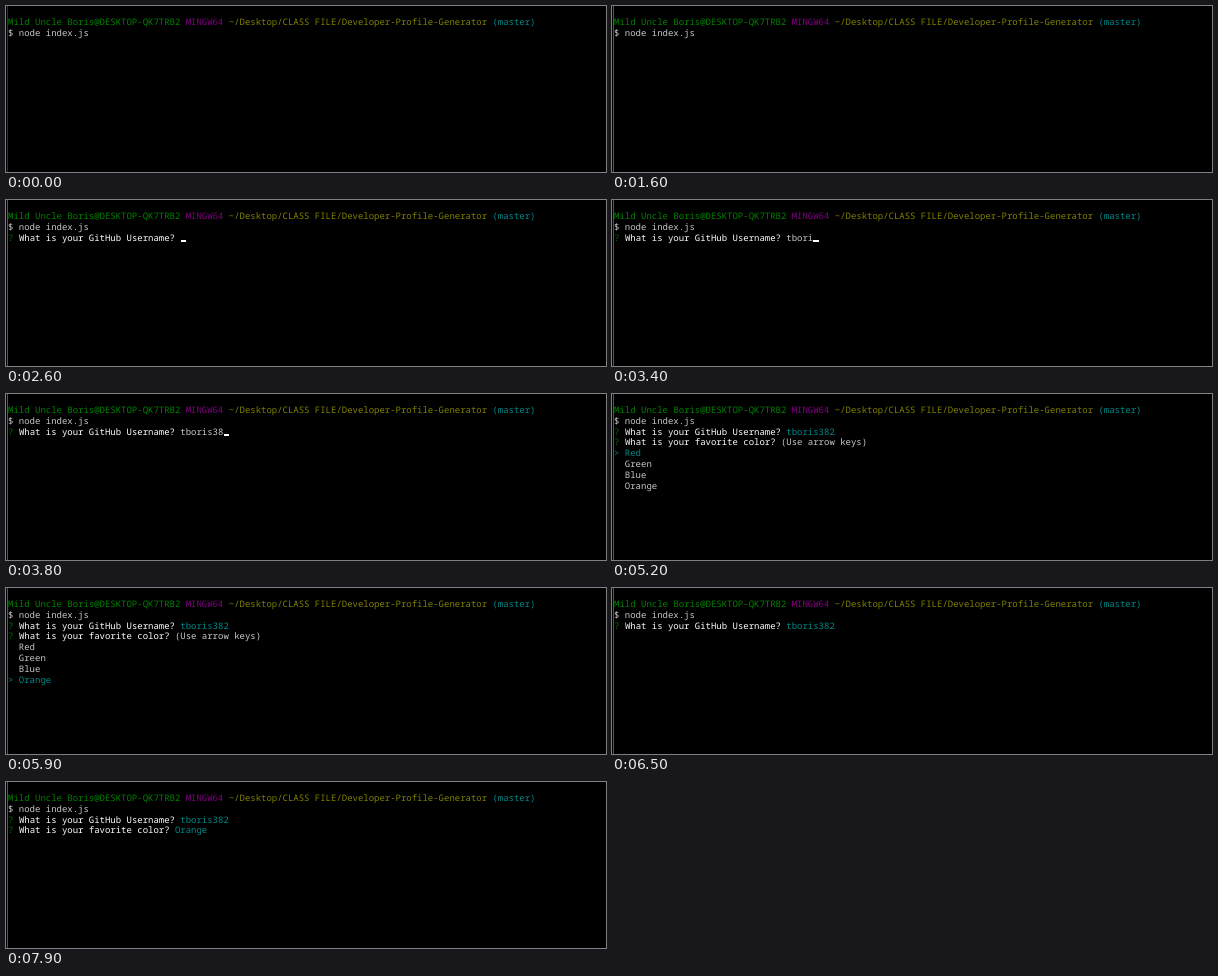
An HTML page that plays this animation: 600x166 px, repeating every 8 s.

```html
<!DOCTYPE html>
<html lang="en">
<head>
<meta charset="utf-8">
<title>Terminal prompt</title>
<style>
  html, body { margin: 0; width: 100%; height: 100%; overflow: hidden; background: #000; }
  #term {
    position: relative; width: 600px; height: 166px; overflow: hidden;
    font: 8.98px/10.86px "Noto Sans Mono", "DejaVu Sans Mono", monospace;
    text-rendering: geometricPrecision; font-kerning: none; font-variant-ligatures: none;
    color: #c8c8c8; white-space: pre;
  }
  #edge { position: absolute; left: 1px; top: 0; width: 1px; height: 166px; background: #303030; }
  #edge.focus { background: #267339; }
  .row { position: absolute; left: 2.1px; height: 10.86px; }
  #cursor { position: absolute; width: 5.4px; height: 2px; background: #fff; }
  .g { color: #008000; }
  .m { color: #800080; }
  .y { color: #808000; }
  .c { color: #008888; }
  .w { color: #fff; font-weight: 500; }
  .q { color: #006a00; }
</style>
</head>
<body>
<div id="term"><div id="edge"></div><div id="cursor"></div></div>
<script>
const LOOP = 8000, COL = 5.388, ROW = 10.86, LEFT = 2.1, TOP = 10.8;
const USER = 'tboris382';
const COLORS = ['Red', 'Green', 'Blue', 'Orange'];
const KEYS = [2800, 2900, 3000, 3300, 3400, 3500, 3600, 3700, 4200];
const PICKS = [5300, 5600, 5900];
const ASK = 1900, ENTER = 4500, CLEAR = 6500, DONE = 6600;

// [from, to, row, column]; typing moves the column along
const CURSOR = [
  [100, 500, 1, 15],
  [1000, 1400, 2, 0],
  [ASK, 2200, 2, 32],
  [2600, ENTER, 2, 32],
  [DONE, 6900, 4, 0],
  [7400, 7800, 4, 0]
];

const term = document.getElementById('term');
const edge = document.getElementById('edge');
const cursor = document.getElementById('cursor');

const span = (cls, text) => `<span class="${cls}">${text}</span>`;
const passed = (times, t) => times.filter(at => t >= at).length;
const question = text => span('q', '?') + ' ' + span('w', text) + ' ';

const rows = Array.from({ length: 8 }, (_, i) => {
  const el = document.createElement('div');
  el.className = 'row';
  el.style.top = TOP + i * ROW + 'px';
  return term.appendChild(el);
});

const prompt = [
  span('g', 'Mild Uncle Boris@DESKTOP-QK7TRB2'),
  span('m', 'MINGW64'),
  span('y', '~/Desktop/CLASS FILE/Developer-Profile-Generator'),
  span('c', '(master)')
].join(' ');

function lines(t) {
  const out = [prompt, '$ node index.js'];
  if (t < ASK) return out;

  const typed = USER.slice(0, passed(KEYS, t));
  out.push(question('What is your GitHub Username?') + (t < ENTER ? typed : span('c', typed)));
  if (t < ENTER || (t >= CLEAR && t < DONE)) return out;

  const ask = question('What is your favorite color?');
  if (t >= DONE) return [...out, ask + span('c', 'Orange')];

  const pick = passed(PICKS, t);
  const list = COLORS.map((name, i) => i === pick ? span('c', '&gt; ' + name) : '  ' + name);
  return [...out, ask + '(Use arrow keys)', ...list];
}

function draw(t) {
  const text = lines(t);
  rows.forEach((el, i) => {
    const html = text[i] || '';
    if (el.shown !== html) el.innerHTML = el.shown = html;
  });

  edge.className = t >= 100 ? 'focus' : '';

  const spot = CURSOR.find(([from, to]) => t >= from && t < to);
  cursor.style.display = spot ? 'block' : 'none';
  if (!spot) return;
  const [, , row, col] = spot;
  const shift = col === 32 ? passed(KEYS, t) : 0;
  cursor.style.left = LEFT + (col + shift) * COL + 'px';
  cursor.style.top = Math.round(TOP + (row + 1) * ROW) - 3 + 'px';
}

function tick(now) {
  draw(now % LOOP);
  requestAnimationFrame(tick);
}
draw(0);
requestAnimationFrame(tick);
</script>
</body>
</html>
```
